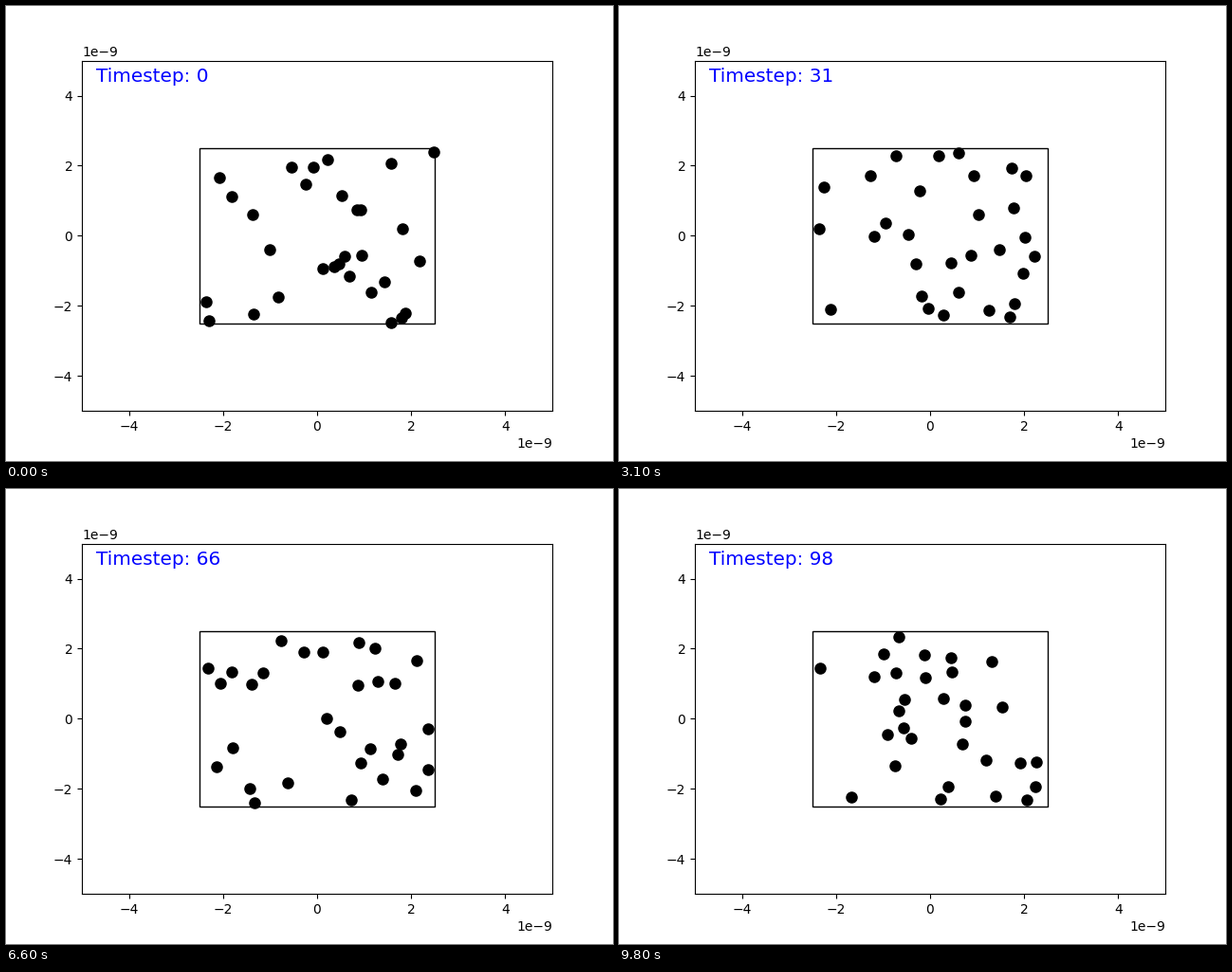
A matplotlib script that plays this animation: 640 by 480 pixels, repeating every 9.9 s.

```python
import numpy as np
import matplotlib.pyplot as plt
from matplotlib.animation import FuncAnimation
from matplotlib.patches import Rectangle

FRAMES, INTERVAL = 99, 100
COUNT = 30
SUBSTEPS = 4
NM = 1e-9         # the simulation runs in nanometres
HALF = 2.5        # half the side of the container
WALL = 2.38       # where centres turn back
CONTACT = 0.3     # distance between two touching centres
SPEED = 0.04      # spread of each velocity component per step


def bounce_walls(pos, vel):
    vel[:] = np.where(pos < -WALL, abs(vel), vel)
    vel[:] = np.where(pos > WALL, -abs(vel), vel)


def bounce_pairs(pos, vel):
    """Elastic collisions between equal masses."""
    gaps = np.linalg.norm(pos[:, None] - pos[None], axis=2)
    for i, j in np.argwhere(np.triu(gaps < CONTACT, 1)):
        normal = (pos[i] - pos[j]) / max(gaps[i, j], 1e-9)
        closing = (vel[i] - vel[j]) @ normal
        if closing < 0:
            vel[i] -= closing * normal
            vel[j] += closing * normal


def simulate():
    rng = np.random.default_rng(0)
    pos = rng.uniform(-HALF, HALF, (COUNT, 2))
    vel = rng.normal(0, SPEED, (COUNT, 2))
    track = [pos.copy()]
    while len(track) < FRAMES:
        for _ in range(SUBSTEPS):
            bounce_pairs(pos, vel)
            bounce_walls(pos, vel)
            pos += vel / SUBSTEPS
        track.append(pos.copy())
    return np.array(track) * NM


fig, ax = plt.subplots(figsize=(6.4, 4.8), dpi=100)
ax.set_xlim(-5 * NM, 5 * NM)
ax.set_ylim(-5 * NM, 5 * NM)
ax.add_patch(Rectangle((-HALF * NM, -HALF * NM), 2 * HALF * NM,
                       2 * HALF * NM, fill=False, lw=1))
dots, = ax.plot([], [], "ko", ms=8)
label = ax.text(-4.7 * NM, 4.4 * NM, "", color="blue", fontsize=14.4)

track = simulate()


def draw(step):
    dots.set_data(*track[step].T)
    label.set_text(f"Timestep: {step}")
    return dots, label


anim = FuncAnimation(fig, draw, frames=FRAMES, interval=INTERVAL,
                     repeat=True, repeat_delay=0)
plt.show()
```
